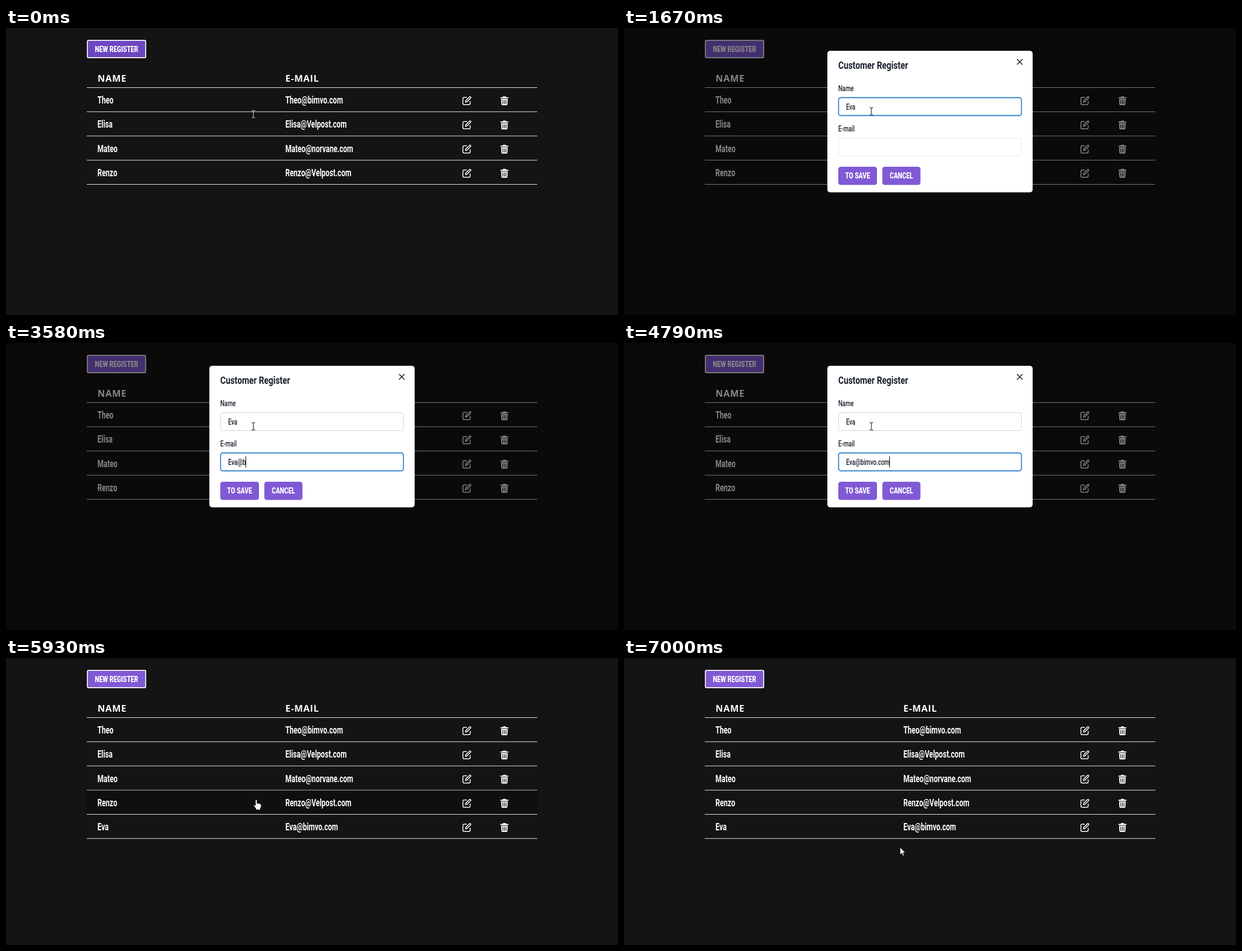
Write an HTML page that moves like this. It is 1091x513 px and loops after 7.15 s.

```html
<!DOCTYPE html>
<html lang="en">
<head>
<meta charset="utf-8">
<title>Customer Register</title>
<style>
html, body { margin: 0; width: 100%; height: 100%; overflow: hidden; background: #141414; }
svg { display: block; width: 1091px; height: 513px; }
text { font-family: Roboto, "Liberation Sans", sans-serif; white-space: pre; }
.head { font: 700 16.2px "Open Sans", "Noto Sans", sans-serif; letter-spacing: .82px; }
.cell { font-size: 18.5px; font-weight: 700; }
.btn { font-size: 15px; font-weight: 900; }
.title { font-size: 18.5px; font-weight: 700; }
.field { font-size: 14.8px; font-weight: 500; }
</style>
</head>
<body>
<svg id="stage" viewBox="0 0 1091 513" xmlns="http://www.w3.org/2000/svg"></svg>
<script>
const LOOP = 7150;
const stage = document.getElementById('stage');

// One condensed proportion per text style
const WIDTH = { head: 1, cell: .68, btn: .73, title: .8, field: .7 };

function add(parent, tag, attrs, text) {
  const el = document.createElementNS('http://www.w3.org/2000/svg', tag);
  set(el, attrs);
  if (text) el.textContent = text;
  parent.appendChild(el);
  return el;
}
function set(el, attrs) {
  for (const k in attrs) el.setAttribute(k, attrs[k]);
}
function show(el, on) {
  el.setAttribute('visibility', on ? 'visible' : 'hidden');
}
function label(parent, style, x, y, text, fill, anchor = 'start') {
  return add(parent, 'text', {
    class: style, fill, 'text-anchor': anchor,
    transform: `translate(${x} ${y}) scale(${WIDTH[style]} 1)`
  }, text);
}
function box(parent, x, y, width, height, rx, fill, more = {}) {
  return add(parent, 'rect', { x, y, width, height, rx, fill, ...more });
}

const clamp = v => Math.max(0, Math.min(1, v));
const prog = (t, a, b) => clamp((t - a) / (b - a));
const smooth = p => p * p * (3 - 2 * p);
const mix = (a, b, p) => a + (b - a) * p;
function blend(a, b, p) {
  return `rgb(${a.map((v, i) => Math.round(mix(v, b[i], p)))})`;
}

const BLUE = [49, 130, 206], PALE = [99, 166, 224];
const REST = [226, 232, 240], HOVER = [203, 213, 224];
const INK = '#1a202c', PURPLE = '#805ad5', DEEP = '#6b46c1';
const lineY = i => 106.05 + 43.24 * i;

// Page
box(stage, 0, 0, 1091, 513, 0, '#141414');
const newBtn = box(stage, 145.1, 22.1, 103.9, 31, 2, PURPLE, { stroke: '#fff', 'stroke-width': 1.7 });
label(stage, 'btn', 197, 42.5, 'NEW REGISTER', '#fff', 'middle');
label(stage, 'head', 163.3, 96, 'NAME', '#fff');
label(stage, 'head', 498.1, 96, 'E-MAIL', '#fff');
const rule = (parent, i) => box(parent, 144, lineY(i), 803, .9, 0, '#fff');
rule(stage, 0);

const EDIT = 'M7.5 2H3.2Q1 2 1 4.2V12.8Q1 15 3.2 15H11.8Q14 15 14 12.8V9' +
  'M5.6 10.4L6.2 7.6 13 .9Q13.6.4 14.2 .9L15 1.8Q15.5 2.4 15 3L8.3 9.8Z';
const TRASH = 'M.5 1.8H4.4L5.2 .3H9.8L10.6 1.8H14.5V3.9H.5ZM1.6 4.9H13.4L12.8 14.8Q12.7 16.2 11.3 16.2H3.7' +
  'Q2.3 16.2 2.2 14.8ZM4 6.8V14.2H5.2V6.8ZM6.9 6.8V14.2H8.1V6.8ZM9.8 6.8V14.2H11V6.8Z';

function addRow(i, name, mail) {
  const g = add(stage, 'g', {});
  const top = lineY(i), end = lineY(i + 1);
  const back = box(g, 144, top + .9, 803, end - top - .9, 0, '#0f0f0f');
  label(g, 'cell', 163, top + 29.1, name, '#fff');
  label(g, 'cell', 498, top + 29.1, mail, '#fff');
  add(g, 'path', {
    d: EDIT, transform: `translate(813.5 ${top + 16})`, fill: 'none',
    stroke: '#fff', 'stroke-width': 1.5, 'stroke-linejoin': 'round', 'stroke-linecap': 'round'
  });
  add(g, 'path', {
    d: TRASH, transform: `translate(881 ${top + 15.8})`, fill: '#fff', 'fill-rule': 'evenodd'
  });
  rule(g, i + 1);
  return { g, back, top, end };
}
const NAME = 'Eva', MAIL = 'Eva@bimvo.com';
const rows = [
  ['Theo', 'Theo@bimvo.com'],
  ['Elisa', 'Elisa@Velpost.com'],
  ['Mateo', 'Mateo@norvane.com'],
  ['Renzo', 'Renzo@Velpost.com'],
  [NAME, MAIL]
].map((r, i) => addRow(i, r[0], r[1]));

// Dialog
const shade = box(stage, 0, 0, 1091, 513, 0, '#000');
const modal = add(stage, 'g', {});
box(modal, 362.5, 40.7, 366, 253, 5, '#fff');
label(modal, 'title', 382, 73.3, 'Customer Register', INK);
add(modal, 'path', { d: 'M701 56l9 9m0-9l-9 9', stroke: INK, 'stroke-width': 1.6, 'stroke-linecap': 'round' });

function addField(y, title) {
  label(modal, 'field', 382, y - 11, title, INK);
  const ring = box(modal, 382.5, y + .5, 326, 32, 4, '#fff');
  const text = label(modal, 'field', 396, y + 22, '', INK);
  const caret = box(modal, 396, y + 6.5, 1, 20, 0, '#000');
  return { ring, text, caret };
}
const nameField = addField(124, 'Name');
const mailField = addField(196, 'E-mail');

const saveBtn = box(modal, 382, 248, 69, 32.5, 4.5, PURPLE);
label(modal, 'btn', 416.5, 269.4, 'TO SAVE', '#fff', 'middle');
box(modal, 460.5, 248, 68, 32.5, 4.5, PURPLE);
label(modal, 'btn', 494.5, 269.4, 'CANCEL', '#fff', 'middle');

// Pointers, each with its hot spot at 0,0
const beam = add(stage, 'path', {
  d: 'M-3 -6.5h2.2l.8.8.8-.8H3M0 -6V6M-3 6.5h2.2l.8-.8.8.8H3', fill: 'none', 'stroke-width': 1
});
const outline = { fill: '#fff', stroke: '#000', 'stroke-width': 1, 'stroke-linejoin': 'round' };
const hand = add(stage, 'path', {
  d: 'M-1.5 0Q0 -2.4 1.5 0V6L3 5.3 4.3 6.2 5.6 5.8 6.9 6.8Q9 6.4 9 8.5V12L7.5 15V17.5H-.5V15.5' +
    'L-4.6 10Q-4.6 7.8 -2.8 8.7L-1.5 10Z', ...outline
});
const arrow = add(stage, 'path', {
  d: 'M0 0V14L3.2 11 5.5 16 7.8 15 5.5 10.2H9.7Z', ...outline
});

const NAME_KEYS = [750, 980, 1130];
const MAIL_KEYS = [2240, 2450, 2550, 3020, 3560, 3740, 3830, 3930, 4160, 4420, 4540, 4670, 4790];
const SAVE = 5790;

function type(field, word, keys, t, caretOn) {
  const s = word.slice(0, keys.filter(k => t >= k).length);
  field.text.textContent = s;
  const w = s ? field.text.getComputedTextLength() * WIDTH.field : 0;
  field.caret.setAttribute('x', Math.round(396 + w));
  show(field.caret, caretOn);
}
function focus(field, rest, from, p) {
  set(field.ring, { stroke: blend(rest, from, p), 'stroke-width': 1 + .8 * p });
}

function pointer(t) {
  if (t < 20) return [441, 153.5];
  if (t < 6140) {
    const p = smooth(prog(t, 5330, 5720));
    return [mix(441, 446, p), mix(148.5, 254, p)];
  }
  const p = smooth(prog(t, 6140, 6850)), q = prog(t, 6870, 7000);
  return [mix(446, 490.5, p) + q, mix(254, 336, p) + 2 * q];
}

function draw(t) {
  const [x, y] = pointer(t);
  const open = t >= 20 && t < 5930;
  const away = smooth(prog(t, SAVE, 5930));
  const saved = t >= SAVE;

  newBtn.setAttribute('fill', t < 20 ? DEEP : PURPLE);
  show(rows[4].g, saved);
  rows.forEach(r => r.back.setAttribute('opacity', saved && y > r.top && y < r.end ? 1 : 0));

  set(shade, { opacity: open ? .48 * (1 - away) : 0 });
  const k = 1 - .05 * away;
  set(modal, {
    opacity: open ? 1 - away : 0,
    transform: `translate(545.5 167) scale(${k}) translate(-545.5 -167)`
  });

  const glow = prog(t, 340, 480), shift = smooth(prog(t, 1670, 1900));
  const from = PALE.map((v, i) => mix(v, BLUE[i], glow));
  focus(nameField, y < 157 ? HOVER : REST, from, 1 - shift);
  focus(mailField, REST, BLUE, shift);
  type(nameField, NAME, NAME_KEYS, t, open && t < 1670);
  type(mailField, MAIL, MAIL_KEYS, t, open && t >= 1700 && t < SAVE);
  saveBtn.setAttribute('fill', y > 248 ? DEEP : PURPLE);

  const onField = y < 157 || (y > 196 && y < 229);
  const onLink = saved ? y < 322 : y > 248;
  const useBeam = !saved && onField;
  show(beam, useBeam);
  show(hand, onLink);
  show(arrow, !useBeam && !onLink);
  beam.setAttribute('stroke', open ? '#000' : '#ddd');
  const at = `translate(${Math.round(x)} ${Math.round(y)})`;
  [beam, hand, arrow].forEach(c => c.setAttribute('transform', at));
}

const start = performance.now();
function tick() {
  draw((performance.now() - start) % LOOP);
  requestAnimationFrame(tick);
}
tick();
</script>
</body>
</html>
```
